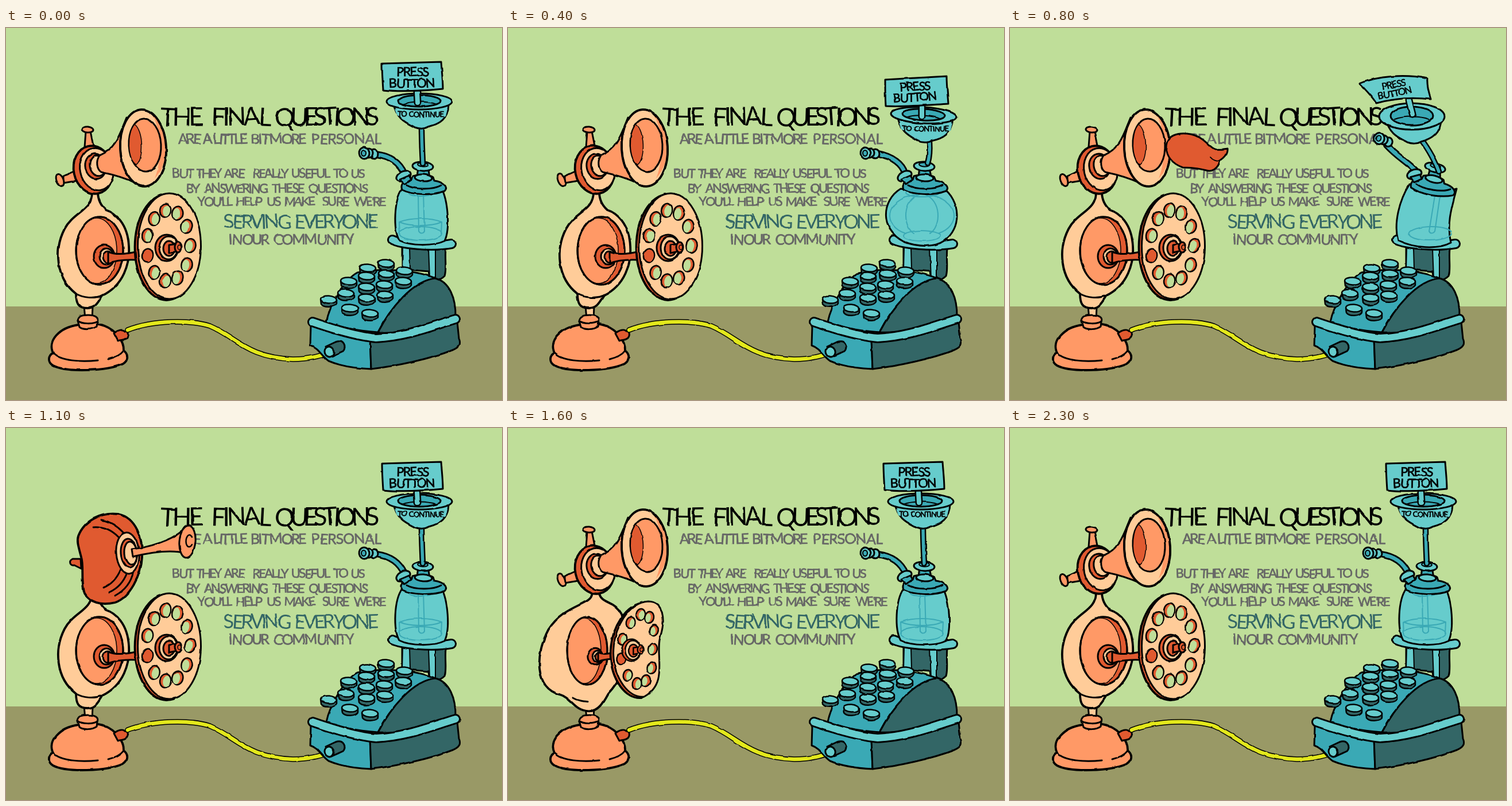
An HTML page for the animation above (2400 ms loop, 864 by 648 pixels).

```html
<!DOCTYPE html>
<html lang="en">
<head>
<meta charset="utf-8">
<title>The final questions</title>
<style>
  html, body { margin: 0; width: 100%; height: 100%; overflow: hidden; background: #bfde99; }
  svg { display: block; width: 864px; height: 648px; }
  text { font-family: Lato, "Open Sans", sans-serif; }
</style>
</head>
<body>
<svg viewBox="0 0 864 648">
  <defs>
    <filter id="ink" filterUnits="userSpaceOnUse" x="0" y="0" width="864" height="648" color-interpolation-filters="sRGB">
      <feTurbulence id="noise" type="fractalNoise" baseFrequency=".05" numOctaves="2" result="n"/>
      <feDisplacementMap in="SourceGraphic" in2="n" scale="2.6" xChannelSelector="R" yChannelSelector="G"/>
    </filter>
  </defs>
  <rect width="864" height="648" fill="#bfde99"/>
  <rect y="485" width="864" height="163" fill="#999966"/>
  <g id="scene" filter="url(#ink)" stroke="#000" stroke-width="3" stroke-linejoin="round" stroke-linecap="round"></g>
</svg>
<script>
const PEACH = '#ffcc99', ORANGE = '#ff9966', RED = '#e05a30', GREEN = '#bfde99';
const LIGHT = '#66cccc', TEAL = '#3aa9b5', DARK = '#336666', GRAY = '#666666';
const scene = document.getElementById('scene'), noise = document.getElementById('noise');

const lerp = (a, b, t) => a + (b - a) * t;
const path = (d, fill = 'none', more = '') => `<path d="${d}" fill="${fill}" ${more}/>`;
const oval = (x, y, rx, ry, fill = 'none', turn = 0, more = '') =>
  `<ellipse cx="${x}" cy="${y}" rx="${rx}" ry="${ry}" fill="${fill}" transform="rotate(${turn} ${x} ${y})" ${more}/>`;
const group = (transform, ...parts) => `<g transform="${transform}">${parts.join('')}</g>`;
const tube = (d, fill, outer, inner) =>
  path(d, 'none', `stroke-width="${outer}"`) + path(d, 'none', `stroke="${fill}" stroke-width="${inner}"`);
const BARE = 'stroke="none"', BOLD = 'stroke-width="3.8"';

// Blend two paths that share the same commands.
function mix(a, b, t) {
  const target = b.match(/-?[\d.]+/g);
  let i = 0;
  return a.replace(/-?[\d.]+/g, n => lerp(+n, +target[i++], t).toFixed(1));
}
const ovalPath = (x, y, rx, ry) => {
  const k = .552, a = rx * k, b = ry * k;
  return `M${x - rx} ${y} C${x - rx} ${y - b} ${x - a} ${y - ry} ${x} ${y - ry} ` +
    `C${x + a} ${y - ry} ${x + rx} ${y - b} ${x + rx} ${y} ` +
    `C${x + rx} ${y + b} ${x + a} ${y + ry} ${x} ${y + ry} ` +
    `C${x - a} ${y + ry} ${x - rx} ${y + b} ${x - rx} ${y}`;
};
// Linear interpolation through [step, value] keys.
function at(step, keys) {
  if (step <= keys[0][0]) return keys[0][1];
  for (let i = 1; i < keys.length; i++) {
    const [s0, v0] = keys[i - 1], [s1, v1] = keys[i];
    if (step <= s1) return lerp(v0, v1, (step - s0) / (s1 - s0));
  }
  return keys[keys.length - 1][1];
}

// Hand lettering: each letter tilts a little, small sizes get a heavier pen.
function word(x, y, size, gap, color, string) {
  const tilt = [...string].map((_, i) => (i * 7 + x) % 9 - 4).join(' ');
  const pen = size < 30 ? .7 : 0;
  return `<text x="${x}" y="${y}" font-size="${size}" letter-spacing="${gap}" fill="${color}" stroke="${color}" stroke-width="${pen}" rotate="${tilt}">${string}</text>`;
}
const line = (y, size, gap, color, words) =>
  words.map(([x, string, own]) => word(x, y, size, own ?? gap, color, string)).join('');

const lettering = [
  line(170, 44, -4.5, '#000', [[268, 'THE'], [357, 'FINAL'], [467, 'QUESTIONS', -8]]),
  line(202, 25, -2.5, GRAY, [[300, 'ARE', -3.5], [343, 'A'], [361, 'LITTLE', -3.2], [426, 'BIT'], [459, 'MORE', -3], [532, 'PERSONAL', -.8]]),
  line(261, 22, -2.5, GRAY, [[289, 'BUT'], [331, 'THEY', -3.4], [380, 'ARE'], [429, 'REALLY'], [497, 'USEFUL'], [570, 'TO'], [600, 'US']]),
  line(287, 22, -2.5, GRAY, [[313, 'BY'], [345, 'ANSWERING'], [463, 'THESE'], [527, 'QUESTIONS']]),
  line(310, 22, -2.5, GRAY, [[334, 'YOU\'LL'], [400, 'HELP'], [454, 'US'], [484, 'MAKE'], [551, 'SURE'], [606, 'WE\'RE']]),
  line(349, 34, -4, DARK, [[379, 'SERVING'], [502, 'EVERYONE']]),
  line(377, 25, -2, GRAY, [[388, 'IN'], [411, 'OUR', -3], [466, 'COMMUNITY']])
].join('');

const cable = tube('M212 526 C255 509 320 508 355 519 C402 539 420 574 500 577 C530 577 550 570 566 565', '#e3e81c', 9.5, 6.5);

const phoneBase = [
  path('M136 484 L138 508 L150 508 L151 484Z', PEACH),
  path('M82 566 C72 545 92 522 126 517 C145 513 162 515 172 519 C190 526 206 545 205 562 C213 568 214 578 204 585 C175 598 105 600 82 588 C72 582 73 571 82 566Z', ORANGE, BOLD),
  path('M82 566 C95 580 130 582 160 579 M178 577 C190 574 200 569 205 562'),
  path('M125 510 C126 502 132 500 143 500 C156 500 162 505 159 511 L158 520 C150 526 134 526 128 521Z', ORANGE),
  path('M125 510 C132 516 152 516 159 511'),
  path('M188 532 C194 526 204 524 207 528 C213 528 214 535 210 540 C204 545 198 543 195 545Z', RED)
].join('');

const knobs = [
  path('M137 207 L139 180 L147 180 L152 205Z', ORANGE),
  oval(142, 177, 10, 5, ORANGE, 5),
  path('M122 248 L100 258 L100 270 L124 266Z', ORANGE),
  oval(94, 265, 6, 11, ORANGE, -22)
].join('');

const horn = [
  knobs,
  oval(152, 247, 34, 42, RED, -12, BOLD),
  oval(158, 246, 29, 37, PEACH, -12),
  oval(156, 241, 18, 22, RED, -12),
  oval(160, 240, 14, 18, PEACH, -12),
  path('M210 156 C198 185 192 210 163 222 C156 232 158 246 166 251 C185 255 205 260 226 270Z', ORANGE),
  oval(239, 209, 40, 67, PEACH, -3),
  path('M256 152 C286 175 287 232 259 262 C269 240 274 190 256 152Z', ORANGE, BARE),
  oval(242, 204, 28, 46, ORANGE, -3),
  path('M224 168 C239 178 241 227 227 238 C211 230 210 182 224 168Z', RED, 'stroke-width="1.5"'),
  oval(239, 209, 40, 67, 'none', -3, BOLD)
].join('');

const invertedHorn = [
  path('M130 228 L116 228 C108 232 112 241 119 239 L131 245Z', RED),
  path('M126 188 C136 162 165 146 196 150 C226 156 239 192 237 225 C236 256 215 296 190 304 C165 310 145 303 137 288 C130 270 136 240 131 225 C126 206 123 197 126 188Z', RED, BOLD),
  path('M152 172 Q176 170 196 190 M166 160 Q188 164 206 184 M180 286 Q202 276 211 252 M190 292 Q216 278 222 250 M170 278 Q190 270 200 246'),
  oval(212, 218, 20, 36, PEACH, -5),
  oval(214, 218, 14, 25, RED, -5),
  oval(217, 218, 11, 20, PEACH, -5),
  path('M219 211 C250 208 286 196 306 180 L313 218 C286 211 250 217 221 224Z', ORANGE),
  oval(316, 198, 14, 28, ORANGE, 5),
  path('M324 190 C318 180 312 192 314 202 C317 210 322 207 324 203', 'none', 'stroke-width="2.5"')
].join('');

const tongueShape = path('M272 208 C272 186 294 181 315 185 C338 190 346 207 357 211 C366 212 371 211 379 210 C380 221 372 227 366 231 C362 246 351 251 342 248 C326 244 314 243 301 243 C282 236 273 224 272 208Z', RED) +
  path('M366 231 C360 233 353 230 349 225', 'none', 'stroke-width="2"');

function phoneBody(b) {
  const body = mix(
    'M150 286 C150 318 118 320 102 350 C84 385 86 435 122 463 C122 480 126 488 142 488 C156 488 160 478 168 466 C205 448 216 410 214 380 C212 340 190 322 174 317 C164 308 160 298 160 286Z',
    'M146 290 C146 304 90 300 56 352 C30 400 28 462 76 465 C108 466 110 494 142 496 C160 496 170 478 178 462 C190 440 214 400 208 370 C206 330 200 312 188 303 C176 298 164 300 160 290Z', b);
  const chin = mix('M122 463 C135 470 152 472 168 466', 'M110 473 C118 478 122 478 126 482', b);
  const shaft = mix(
    'M178 390 C190 395 210 394 230 389 L230 404 C210 403 190 405 178 410Z',
    'M148 391 C152 394 157 394 162 391 L162 402 C157 402 152 403 148 406Z', b);
  const face = mix(ovalPath(284.5, 380, 55, 92),
    'M162 400 C162 355 190 312 226 309 C250 310 244 335 230 354 C215 378 265 430 215 466 C190 470 164 440 162 400', b);
  const dishX = lerp(163, 127, b), dishRx = lerp(41, 32, b), hubX = lerp(171, 144, b), hub = lerp(1, .6, b);
  let holes = '';
  for (let i = 0; i < 11; i++) {
    const a = i * Math.PI * 2 / 11, c = Math.cos(a), s = Math.sin(a);
    const x = lerp(283 + 38 * c, 195 + 24 * c + (s < 0 ? -18 * s : 8 * s), b);
    const y = lerp(379 + 62 * s, 388 + 60 * s, b);
    const rx = lerp(9.5, 7, b), ry = lerp(12, 9, b);
    holes += oval(x, y, rx, ry, RED, 10, 'stroke-width="2.5"') +
      oval(x + (c > .2 ? -2 : 2), y + 1, rx - 3.2, ry - 2, i === 5 ? RED : GREEN, 10, BARE);
  }
  return [
    path(body, PEACH, BOLD), path(chin),
    oval(dishX, 388, dishRx, 59, RED),
    oval(dishX - 5, 388, dishRx - 6, 57, ORANGE, 0, 'stroke-width="1.5"'),
    oval(dishX, 388, dishRx, 59),
    oval(hubX, 398, 18 * hub, 20 * hub, RED),
    oval(hubX + 4, 398, 12 * hub, 14 * hub, PEACH),
    oval(hubX + 6, 399, 8 * hub, 10 * hub, RED),
    path(shaft, RED),
    group('translate(-5 2)', path(face, RED, BOLD)),
    path(face, PEACH), holes,
    group(`translate(${lerp(280, 184, b)} ${lerp(383, 389, b)}) scale(${lerp(1, .75, b)})`,
      oval(0, 0, 20, 23, RED), oval(3, 0, 16, 20, PEACH), oval(4, 1, 10, 13, RED),
      path('M4 -5 L18 -7 L18 6 L4 9Z', RED), oval(20, -1, 6, 9, RED), oval(22, -1, 3, 4, RED, 0, 'stroke-width="1.5"'))
  ].join('');
}

const keySpots = [[662, 411], [630, 419], [694, 424], [662, 429], [628, 433], [597, 442], [692, 442], [659, 448],
  [628, 452], [592, 463], [660, 466], [628, 471], [562, 474], [599, 489], [634, 498]];
const keys = keySpots.map(([x, y]) => {
  const r = 14;
  return path(`M${x - r} ${y - 1} L${x - r + 1} ${y + 7} C${x - 8} ${y + 14} ${x + 10} ${y + 13} ${x + r} ${y + 6} L${x + r} ${y - 1}Z`, DARK, 'stroke-width="2.4"') +
    oval(x, y - 1, r, 6.5, LIGHT, 4, 'stroke-width="2.4"');
}).join('');

const register = [
  path('M531 518 L530 553 C545 558 550 572 562 580 C585 590 615 593 636 594 L634 540Z', TEAL),
  path('M634 542 L636 594 C680 589 740 576 778 561 C790 556 793 550 789 541 L786 512Z', DARK),
  path('M558 512 C564 482 590 438 612 426 C650 418 710 420 748 436 C705 445 668 490 648 530 C610 527 575 520 558 512Z', TEAL),
  path('M648 530 C670 488 708 440 748 436 C772 442 784 470 783 504 C740 522 690 532 648 530Z', DARK),
  tube('M534 512 C560 521 610 537 645 540 C700 537 740 520 783 507', LIGHT, 18, 12),
  path('M557 555 L574 547 C588 542 594 556 587 563 L567 572Z', DARK),
  oval(563, 564, 8, 9, LIGHT, -20),
  keys
].join('');

const pillar = [
  path('M690 380 L766 384 C764 400 768 420 764 432 C756 440 746 441 738 437 L736 424 L690 420Z', DARK),
  path('M691 382 L703 384 L704 420 L690 420Z', LIGHT, 'stroke-width="2"'),
  path('M736 384 L748 384 L748 439 L738 437Z', LIGHT, 'stroke-width="2"'),
  tube('M673 369 C690 377 740 382 776 376', LIGHT, 18, 12)
].join('');

const lid = [
  path('M690 282 C686 272 694 264 706 264 L708 258 C716 255 738 255 744 260 L746 266 C762 268 771 277 764 284 C742 292 708 291 690 282Z', TEAL),
  path('M698 274 C712 282 744 282 758 274'),
  path('M718 242 L716 260 L738 261 L735 242Z', TEAL),
  oval(727, 261, 15, 6, LIGHT, 4),
  oval(726, 241, 18, 8, LIGHT, 4),
  oval(726, 238, 9, 3.5, TEAL, 4, 'stroke-width="2"'),
  oval(692, 258, 13, 8, LIGHT, -28),
  path('M686 264 L694 272 L706 264 L702 257Z', TEAL)
].join('');

const nozzle = [
  oval(641, 219, 7, 8, LIGHT), oval(632, 218, 7, 8, LIGHT, 10),
  oval(624, 218, 9, 10, LIGHT, -10), oval(623, 218, 4, 5, TEAL, 0, 'stroke-width="2"')
].join('');

function machineTop(s, l) {
  const pose = (rest, squashed, leaning) => mix(mix(rest, squashed, s), leaning, l);
  const jar = pose(
    'M690 280 C676 300 674 350 685 370 C705 380 745 380 764 371 C774 350 770 300 758 278 C740 290 708 290 690 280Z',
    'M685 280 C652 300 648 350 690 372 C715 382 745 382 760 371 C792 350 790 300 758 278 C740 283 708 285 685 280Z',
    'M696 272 C678 300 668 340 676 370 C705 384 745 386 768 374 C760 340 770 310 778 280 C755 288 718 284 696 272Z');
  const stem = pose('M724 172 C724 195 725 215 726 236', 'M735 198 C736 212 735 225 732 236', 'M716 194 C730 212 742 235 747 250');
  const pipe = pose('M694 254 C688 240 675 224 646 220', 'M692 252 C688 238 672 224 646 219', 'M708 250 C695 235 675 225 656 204');
  const post = pose('M716 112 L717 130', 'M722 138 L722 154', 'M695 126 L701 150');
  const sign = pose(
    'M655 62 C690 61 725 60 758 59 C759 75 761 90 761 106 C730 109 690 112 657 108 C656 92 655 77 655 62Z',
    'M658 90 C695 88 730 86 765 84 C765 100 767 118 768 132 C735 134 690 138 659 136 C658 120 658 105 658 90Z',
    'M609 97 C640 83 690 80 727 88 C726 100 730 115 733 124 C700 120 670 122 638 131 C630 118 618 106 609 97Z');
  const folds = [-2, -1, 1, 2].map(i => `M${722 + i * 5} 290 C${722 + i * 34} 300 ${722 + i * 34} 345 ${722 + i * 14} 358`).join(' ');
  const calm = Math.max(0, 1 - s * 1.4), pressed = Math.min(1, s);
  const glass = group(`translate(${10 * l} 0) translate(722 360) skewX(${-10 * l}) translate(-722 -360)`,
    `<g fill="none" stroke="${TEAL}" stroke-width="2">
      <g opacity="${calm}">${oval(722, 288, 20, 5)}${oval(722, 358, 37, 12)}
        ${path('M718 288 L719 354 C722 359 727 358 729 354 L727 288')}
        ${l < .3 ? path('M685 338 C705 330 740 330 759 338 M685 338 C705 346 740 346 759 338 M685 338 L686 358 M759 338 L758 358') : ''}</g>
      <g opacity="${pressed}">${path(folds)}${oval(722, 362, 32, 9)}${oval(722, 288, 28, 6)}</g></g>`);
  const bowl = group(`translate(${5 * s - 20 * l} ${24 * s + 26 * l}) rotate(${3 * s} 720 128)`,
    path('M675 132 C680 160 700 166 712 173 C720 176 730 176 736 172 C756 167 770 158 771 134Z', LIGHT),
    oval(720, 128, 57, 14 + 9 * l, LIGHT),
    oval(720, 127, 37, 10 + 6 * l, TEAL),
    path('M690 133 C705 127 735 127 750 133', 'none', 'stroke-width="2"'));
  const label = l > .3 ? '' : group(`translate(${6 * s} ${25 * s})`,
    path('M677 141 C690 146 750 146 769 141 L766 154 C748 160 700 160 681 152Z', LIGHT, BARE),
    word(682, 154, 13, -1.1, '#000', 'TO'), word(702, 155, 13, -.9, '#000', 'CONTINUE'));
  const signText = group(
    `translate(${lerp(708 + 2 * s, 669, l)} ${lerp(84 + 25 * s, 104, l)}) rotate(${-3 * s - 11 * l}) scale(${1 - .05 * s - .25 * l}) translate(-708 -84)`,
    word(680, 84, 22, -1.6, '#000', 'PRESS'), word(667, 104, 22, -1.8, '#000', 'BUTTON'));
  return [
    path(jar, LIGHT), glass,
    tube(pipe, TEAL, 12, 6.5),
    group(`translate(${19 * l} ${-24 * l}) rotate(${18 * l} 629 218)`, nozzle),
    group(`translate(${10 * l} ${2 * l}) rotate(${9 * l} 727 270)`, lid),
    tube(stem, TEAL, 10.5, 5.5),
    bowl, label, tube(post, LIGHT, 13, 8),
    path(sign, LIGHT), signText
  ].join('');
}

function draw(step) {
  const squash = at(step, [[0, 0], [4, 1], [5, 1.15], [7, 0]]);
  const lean = at(step, [[6, 0], [8, 1], [11, 0]]);
  const tongue = at(step, [[6, 0], [8, 1], [9, 1.1], [10, 0]]);
  const bulge = at(step, [[12, 0], [14, 1], [15, 1], [18, 0]]);
  const inverted = step >= 10 && step <= 12;
  const boil = step % 3;

  noise.setAttribute('seed', 3 + boil * 8);
  scene.innerHTML = group(`translate(${boil === 1 ? -1 : 0} 0)`,
    lettering,
    phoneBase, cable,
    phoneBody(bulge),
    inverted ? invertedHorn : horn,
    tongue > 0 ? group(`translate(268 208) scale(${tongue}) translate(-268 -208)`, tongueShape) : '',
    pillar, register,
    machineTop(squash, lean));
}

let shown = -1;
function frame() {
  const step = Math.floor(performance.now() % 2400 / 100);
  if (step !== shown) draw(shown = step);
  requestAnimationFrame(frame);
}
frame();
</script>
</body>
</html>
```
